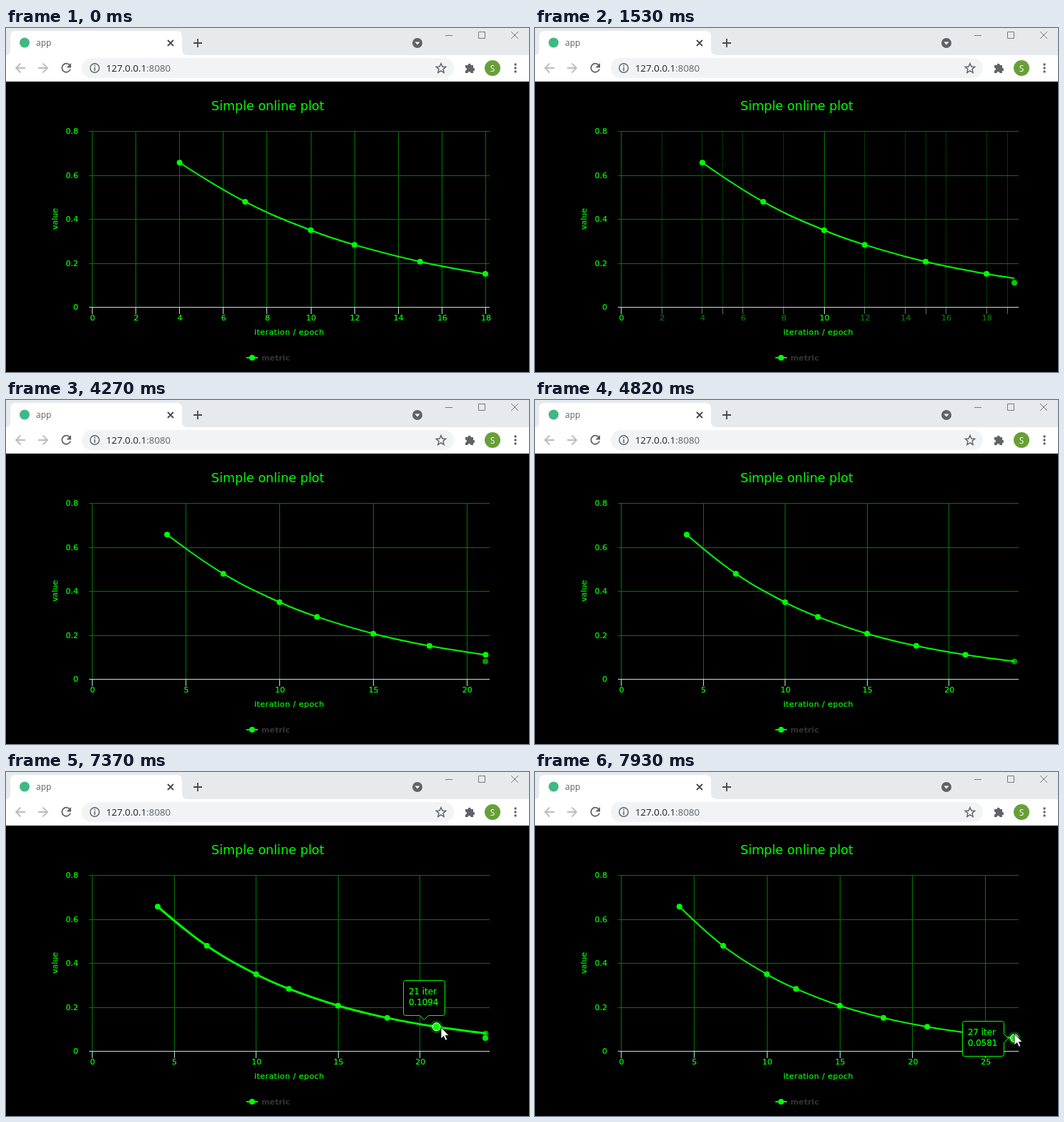
These frames come from a looping animation (731x481 px, 8000 ms). An HTML page:

```html
<!DOCTYPE html>
<html lang="en">
<head>
<meta charset="utf-8">
<title>app</title>
<style>
  html, body { margin: 0; width: 100%; height: 100%; overflow: hidden; background: #000; }
  svg { display: block; }
  .ui { font-family: "Open Sans", sans-serif; }
  .chart { font: 11px "DejaVu Sans", sans-serif; fill: #0f0; stroke: #0f0; stroke-width: .2px; }
  .icon { fill: none; stroke: #5f6368; stroke-width: 1.8; }
  .mid { text-anchor: middle; }
</style>
</head>
<body>
<svg width="731" height="481" viewBox="0 0 731 481">
  <rect width="731" height="481"/>
  <g class="ui">
    <rect width="731" height="38" fill="#e7eaed"/>
    <rect y="38" width="731" height="37" fill="#fff"/>
    <path d="M0 38q6 0 6-8V12q0-8 8-8H238q8 0 8 8V30q0 8 8 8z" fill="#fff"/>
    <circle cx="26" cy="20.500" r="7" fill="#41b883"/>
    <text x="42" y="25" font-size="12" fill="#5f6368">app</text>
    <path class="icon" d="M226 17l8 8m0-8l-8 8M262 21h12m-6-6v12" style="stroke:#45494d"/>
    <circle cx="575" cy="21" r="7" fill="#5f6368"/>
    <path d="M571.500 19.500h7l-3.500 4z" fill="#fff"/>
    <path d="M614 10.500h10M660.500 5.500h9v9h-9zM706 5l10 10m0-10l-10 10" fill="none" stroke="#777"/>
    <path class="icon" d="M27 56H14m6.500-6.500L14 56l6.500 6.500M45 56h13m-6.500-6.500L58 56l-6.500 6.500" style="stroke:#babcbe"/>
    <path class="icon" d="M89 52a6 6 0 1 0 1 5.500"/>
    <path d="M91 49v6.500h-6.500z" fill="#5f6368"/>
    <rect x="106" y="42" width="520" height="28" rx="14" fill="#f1f3f4"/>
    <circle class="icon" cx="124" cy="56" r="6.300" style="stroke-width:1.400"/>
    <path class="icon" d="M124 52v1.700m0 1.300v5" style="stroke-width:1.500"/>
    <text x="140" y="61" font-size="13.300" fill="#202124">127.0.0.1<tspan fill="#5f6368">:8080</tspan></text>
    <path class="icon" d="M608 49.500l1.900 4.500 4.800.400-3.700 3.200 1.200 4.800-4.200-2.600-4.200 2.600 1.200-4.800-3.700-3.200 4.800-.400z" style="stroke-width:1.400"/>
    <path d="M642 52h3.500a2.200 2.200 0 0 1 4.400 0H653v3.800a2.200 2.200 0 0 1 0 4.400V63h-3.500a2 2 0 0 0-4 0H642v-3.500a2 2 0 0 0 0-4z" fill="#5f6368"/>
    <circle cx="680" cy="56" r="11" fill="#689f38"/>
    <text class="mid" x="680" y="60.500" font-size="12" fill="#fff">S</text>
    <path d="M712 51v.010M712 56v.010M712 61v.010" stroke="#5f6368" stroke-width="3.400" stroke-linecap="round"/>
    <path d="M0 74.500h731" stroke="#e4e6e8"/>
  </g>
  <g class="chart">
    <text class="mid" x="366" y="115" style="font-size:17.500px;stroke:none">Simple online plot</text>
    <text class="mid" x="396" y="429" letter-spacing=".43">iteration / epoch</text>
    <text class="mid" transform="translate(72 267)rotate(-90)">value</text>
    <path d="M336 461h16" stroke-width="2" style="stroke-width:2px"/>
    <circle cx="344" cy="461" r="4" stroke="none"/>
    <text x="357" y="465" font-weight="bold" style="fill:#333;stroke:none">metric</text>
    <g id="rows"></g>
  </g>
  <g id="scene"></g>
</svg>
<script>
const LOOP = 8000, LEFT = 120, SPAN = 550, RIGHT = 676;
const rows = document.getElementById('rows'), scene = document.getElementById('scene');

// start, end, steps, from x, y, to x, y
const cursorMoves = [
  [5630, 6190, 8, 724, 240, 659, 288],
  [6190, 6400, 3, 659, 288, 618, 312],
  [6480, 6970, 7, 618, 312, 608, 357],
  [7370, 7930, 8, 608, 357, 670, 366]];
const tipMoves = [
  [5980, 6190, 1, 597.5, 341.5, 597.5, 341.5],
  [6260, 6400, 2, 597.5, 341.5, 555.5, 291.5],
  [7370, 7930, 8, 555.5, 291.5, 597.5, 348.5]];
const updates = [[1250, 1810], [4270, 4820], [7370, 7930]];

const lerp = (a, b, p) => a + (b - a) * p;
const ease = u => (1 - Math.cos(Math.PI * u)) / 2;
const stepped = (t, a, b, n) => Math.min(1, Math.floor((t - a) / (b - a) * n + .001) / n);
const value = v => .9 ** v;
const Y = v => 390 - value(v) * 307.5;
const dot = (x, y, r, extra = '') => `<circle cx="${x}" cy="${y}" r="${r}" fill="#0f0" ${extra}/>`;

function glide(moves, t) {
  const m = moves.filter(m => t >= m[0]).pop();
  if (!m) return null;
  const p = ease(stepped(t, m[0], m[1], m[2]));
  return [lerp(m[3], m[5], p), lerp(m[4], m[6], p)];
}

function spline(pts) {
  let d = `M${pts[0]}`, out = pts[0];
  for (let i = 1; i < pts.length; i++) {
    const [x, y] = pts[i], prev = pts[i - 1], next = pts[i + 1];
    let left = pts[i], right = pts[i];
    if (next) {
      const lx = (1.5 * x + prev[0]) / 2.5, ly = (1.5 * y + prev[1]) / 2.5;
      const rx = (1.5 * x + next[0]) / 2.5, ry = (1.5 * y + next[1]) / 2.5;
      const fix = (ry - ly) * (rx - x) / (rx - lx) + y - ry;
      left = [lx, ly + fix];
      right = [rx, ry + fix];
    }
    d += `C${out} ${left} ${x},${y}`;
    out = right;
  }
  return d;
}

function axis(from, to, p) {
  const oldStep = from <= 18 ? 2 : 5, newStep = to <= 18 ? 2 : 5;
  let s = '';
  for (let v = 0; v <= to; v++) {
    const was = v <= from && v % oldStep === 0, is = v % newStep === 0;
    if (!was && !is) continue;
    const a = LEFT + SPAN * v / from, b = LEFT + SPAN * v / to;
    const x = Math.round(lerp(Math.min(RIGHT, a), b, p)) + .5, labelX = lerp(a, b, p) + 1;
    const alpha = was && is ? 1 : is ? p : 1 - p;
    const labelAlpha = was ? alpha : Math.max(0, 2 * p - 1);
    s += `<path d="M${x} 144V390" stroke="#007800" opacity="${alpha}"/>
      <path d="M${x} 390V400" stroke="#ccd6eb" opacity="${alpha}"/>`;
    if (labelX <= 671.5)
      s += `<text class="chart mid" x="${labelX}" y="409" opacity="${labelAlpha}">${v}</text>`;
  }
  return s + `<path d="M116 390.5H${RIGHT}" stroke="#ccd6eb"/>`;
}

function tooltip([x, y], v) {
  const r = x + 58, b = y + 49, c = x + 29, m = y + 24;
  const side = v === 21
    ? `V${b - 3}q0 3-3 3H${c + 6}l-6 6-6-6`
    : `V${m - 6}l6 6-6 6V${b - 3}q0 3-3 3`;
  return `<path d="M${x + 3} ${y}H${r - 3}q3 0 3 3${side}H${x + 3}q-3 0-3-3V${y + 3}q0-3 3-3z" stroke="#0f0"/>
    <g class="chart" style="font-size:11.8px"><text x="${x + 7.5}" y="${y + 19.5}">${v} iter</text>
    <text x="${x + 7.5}" y="${y + 34.5}">${value(v).toFixed(4)}</text></g>`;
}

function draw(t) {
  const n = updates.filter(u => t >= u[0]).length;
  const from = 15 + 3 * n, to = from + 3;
  const u = n ? stepped(t, ...updates[n - 1], 8) : 1, p = ease(u);
  const scale = lerp(SPAN / from, SPAN / to, p);
  const at = v => v === to ? [670, Y(v)] : [LEFT + .4 + scale * v, Y(v)];
  const data = [4, 7, 10, 12, 15, 18, 21, 24, 27].filter(v => v <= to);
  const pts = data.map(at);
  pts[pts.length - 1] = [670, lerp(Y(from), Y(to), p)];

  const tip = glide(tipMoves, t), cursor = glide(cursorMoves, t);
  const hover = !tip ? 0 : t < 6260 ? 24 : t < 7650 ? 21 : 27;
  const width = t >= 5980 && t < 7440 ? 3 : 2;

  let s = axis(from, to, p);
  s += `<path d="${spline(pts)}" fill="none" stroke="#0f0" stroke-width="${width}" stroke-linejoin="round"/>`;
  for (const v of data) {
    const [x, y] = at(v);
    const alpha = v === 24 ? .6 : v === 27 ? .9 : v === 21 && n === 1 ? lerp(.6, 1, u) : 1;
    if (v !== hover) s += dot(x, y, 4, `opacity="${alpha}"`);
    else if (t < 6900) s += dot(x, y, 10, 'opacity=".28"') + dot(x, y, 4, 'style="fill:#009a00;stroke:#0f0"');
    else s += dot(x, y, 9, 'opacity=".28"') + dot(x, y, 5.5, 'stroke="#fff"');
  }
  if (tip) s += tooltip(tip, hover);
  if (cursor) s += `<path transform="translate(${cursor})" d="M0 0v16l3.700-3.500 2.600 5.700 2.500-1.100-2.500-5.500h5z" fill="#fff" stroke="#000" stroke-width=".8"/>`;
  scene.innerHTML = s;
}

for (let i = 0; i < 5; i++) {
  const y = Math.round(144 + 61.5 * i);
  rows.innerHTML += `<path d="M116 ${y + .5}H${RIGHT}" style="stroke:#007800;stroke-width:1px"/>
    <text x="101" y="${y + 4}" text-anchor="end">${i < 4 ? (.8 - .2 * i).toFixed(1) : 0}</text>`;
}

function frame() {
  draw(performance.now() % LOOP);
  requestAnimationFrame(frame);
}
frame();
</script>
</body>
</html>
```
